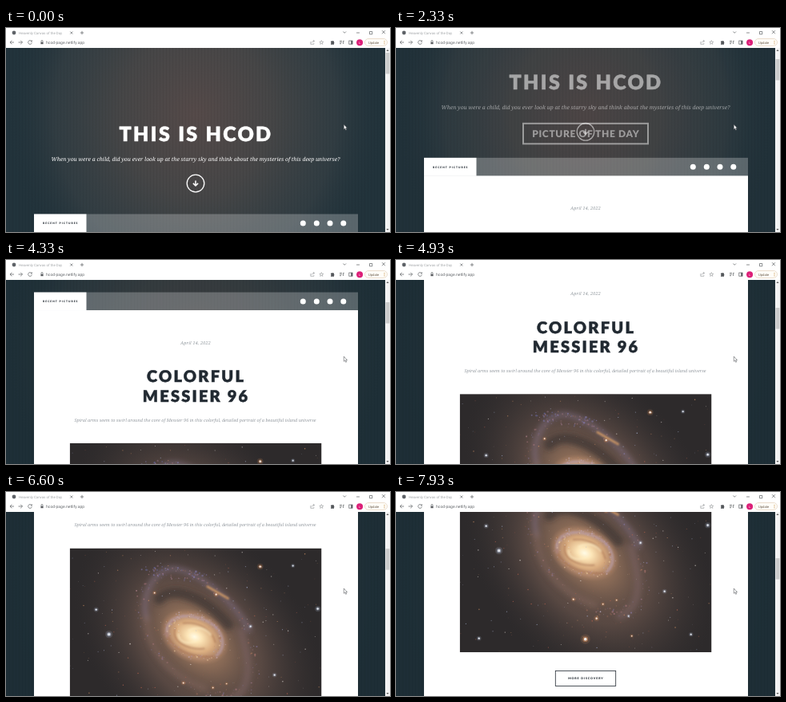
An HTML page for the animation above (8000 ms loop, 480 by 256 pixels).

```html
<!DOCTYPE html>
<html lang="en">
<head>
<meta charset="utf-8">
<title>Heavenly Canvas of the Day</title>
<style>
  html, body { margin: 0; width: 100%; height: 100%; overflow: hidden; background: #fff; }
  svg { display: block; width: 100vw; height: 100vh; }
  text { text-rendering: geometricPrecision; }
  .head { font-family: Lato, "Open Sans", sans-serif; font-weight: 900; text-anchor: middle; }
  .big { stroke: currentColor; stroke-width: .5; fill: currentColor; }
  .serif { font-family: "Noto Serif", serif; font-style: italic; text-anchor: middle; }
  .ui { font-family: Roboto, Arial, sans-serif; }
  .line { fill: none; stroke: #5a5d61; stroke-width: .7; }
</style>
</head>
<body>
<svg viewBox="0 0 480 256" preserveAspectRatio="none">
  <defs>
    <radialGradient id="warm" gradientUnits="userSpaceOnUse" cx="237" cy="108" r="235" gradientTransform="translate(0 -8) scale(1 1.08)">
      <stop offset="0" stop-color="#554a49"/>
      <stop offset=".4" stop-color="#4a4848" stop-opacity=".9"/>
      <stop offset=".75" stop-color="#3b4347" stop-opacity=".6"/>
      <stop offset="1" stop-color="#24353d" stop-opacity="0"/>
    </radialGradient>
    <radialGradient id="haze">
      <stop offset="0" stop-color="#7d6252" stop-opacity=".95"/>
      <stop offset=".5" stop-color="#66524a" stop-opacity=".75"/>
      <stop offset="1" stop-color="#3a3434" stop-opacity="0"/>
    </radialGradient>
    <radialGradient id="halo">
      <stop offset="0" stop-color="#c99c72" stop-opacity=".9"/>
      <stop offset=".45" stop-color="#93715a" stop-opacity=".7"/>
      <stop offset="1" stop-color="#5b4a43" stop-opacity="0"/>
    </radialGradient>
    <radialGradient id="core">
      <stop offset="0" stop-color="#fffbe6"/>
      <stop offset=".2" stop-color="#fde6b8"/>
      <stop offset=".55" stop-color="#e0b283" stop-opacity=".9"/>
      <stop offset=".8" stop-color="#b98d70" stop-opacity=".7"/>
      <stop offset="1" stop-color="#a77c62" stop-opacity="0"/>
    </radialGradient>
    <pattern id="weave" width="4" height="4" patternUnits="userSpaceOnUse">
      <path d="M.5 0V4" stroke="#000" stroke-opacity=".05"/>
    </pattern>
    <filter id="soft" x="-20%" y="-20%" width="140%" height="140%"><feGaussianBlur stdDeviation="3"/></filter>
    <filter id="fine" x="-20%" y="-20%" width="140%" height="140%"><feGaussianBlur stdDeviation=".9"/></filter>
    <clipPath id="frame"><rect width="314.8" height="235.5"/></clipPath>
  </defs>

  <rect width="480" height="256" fill="#22333b"/>
  <rect width="480" height="256" fill="url(#warm)"/>
  <rect id="shade" width="480" height="256" fill="#1b2a32"/>
  <rect width="480" height="256" fill="url(#weave)"/>

  <!-- y = 0 is the top of the navigation bar -->
  <g id="intro" fill="#fff" color="#fff">
    <text class="head big" x="237.5" y="-92" font-size="25" letter-spacing="2.3">THIS IS HCOD</text>
    <text class="serif" x="237" y="-67" font-size="6.85">When you were a child, did you ever look up at the starry sky and think about the mysteries of this deep universe?</text>
    <circle cx="237" cy="-38.5" r="10.8" fill="none" stroke="#fff" stroke-width="1.3"/>
    <path d="M237 -42V-35.8M233.9 -38.6L237 -35.5L240.1 -38.6" fill="none" stroke="#fff" stroke-width="1.5"/>
  </g>
  <g id="banner" fill="#fff">
    <rect x="159" y="-49" width="156" height="25.5" fill="none" stroke="#fff" stroke-width="2"/>
    <text class="head" x="237.3" y="-32" font-size="12" letter-spacing=".65">PICTURE OF THE DAY</text>
  </g>
  <g id="page">
    <rect x="35" width="405" height="22.5" fill="#fff" fill-opacity=".25"/>
    <rect x="35" width="65.5" height="23" fill="#fff"/>
    <text class="head" x="68.3" y="12.7" font-size="3.3" letter-spacing="1.03" fill="#212931">RECENT PICTURES</text>
    <g fill="#fff">
      <circle cx="371.3" cy="11.5" r="3.5"/><circle cx="388.3" cy="11.5" r="3.5"/>
      <circle cx="405" cy="11.5" r="3.5"/><circle cx="421.8" cy="11.5" r="3.5"/>
    </g>
    <rect x="35" y="22.5" width="405" height="760" fill="#fff"/>
    <text class="serif" x="237" y="65" font-size="5.4" font-weight="300" letter-spacing=".2" fill="#8d949a">April 14, 2022</text>
    <g class="head" font-size="20" letter-spacing="2.2" color="#212931">
      <text class="big" x="237.6" y="112.7">COLORFUL</text>
      <text class="big" x="237.6" y="137">MESSIER 96</text>
    </g>
    <text class="serif" x="236.5" y="162" font-size="5.52" font-weight="300" fill="#959ba1">Spiral arms seem to swirl around the core of Messier 96 in this colorful, detailed portrait of a beautiful island universe</text>
    <g id="sky" transform="translate(79.7 189.2)" clip-path="url(#frame)">
      <rect width="314.8" height="235.5" fill="#2d2a2b"/>
      <ellipse cx="162" cy="118" rx="185" ry="130" fill="url(#haze)" transform="rotate(50 162 118)"/>
      <ellipse cx="158" cy="112" rx="100" ry="62" fill="url(#halo)" transform="rotate(45 158 112)"/>
      <g fill="none" filter="url(#soft)" stroke-linecap="round">
        <path d="M96 88C88 62 104 24 132 26C160 29 205 66 224 102" stroke="#8a7890" stroke-width="7" opacity=".45"/>
        <path d="M96 88C98 130 126 160 168 176" stroke="#86695f" stroke-width="9" opacity=".45"/>
        <path d="M214 104C228 150 226 180 200 190" stroke="#83696a" stroke-width="9" opacity=".45"/>
        <path d="M112 64C128 46 168 60 198 96" stroke="#352c2c" stroke-width="13" opacity=".6"/>
      </g>
      <ellipse cx="156" cy="111" rx="46" ry="33" fill="url(#core)" transform="rotate(25 156 111)"/>
      <g fill="none" filter="url(#fine)" stroke-linecap="round">
        <path d="M122 110C116 84 150 78 176 94C192 104 196 124 184 134" stroke="#b9a3bd" stroke-width="3.5" opacity=".5"/>
        <path d="M121 106C126 126 150 138 180 136M132 100C126 116 146 128 168 126M182 118C178 102 162 92 142 94" stroke="#a06a4c" stroke-width="2" opacity=".55"/>
        <path d="M136 108C136 118 148 121 158 116M176 108C170 100 158 98 149 103" stroke="#fff0c8" stroke-width="2.6" opacity=".55"/>
        <path d="M172 48L198 63" stroke="#e2a566" stroke-width="2.6" opacity=".8"/>
      </g>
    </g>
    <rect x="199.3" y="448" width="75.4" height="19" fill="none" stroke="#212931" stroke-width=".8"/>
    <text class="head" x="237.4" y="459" font-size="3.6" letter-spacing=".9" fill="#212931">MORE DISCOVERY</text>
  </g>

  <rect x="474" y="25" width="6" height="231" fill="#f3f3f3"/>
  <path d="M475.4 29L477 27L478.6 29ZM475.4 252L477 254L478.6 252Z" fill="#606060"/>
  <rect id="thumb" x="474.6" y="31" width="4.8" height="26.5" fill="#cacaca"/>

  <g class="ui">
    <rect width="480" height="25" fill="#fff"/>
    <circle cx="10" cy="6" r="2.4" fill="#5f6368"/>
    <text x="16" y="7.6" font-size="4.4" fill="#a3a6a9">Heavenly Canvas of the Day</text>
    <path class="line" d="M80.3 4.5L83.3 7.5M83.3 4.5L80.3 7.5M92.8 6H97.2M95 3.8V8.2"/>
    <path class="line" d="M421.5 4.5L423.3 6.3L425.1 4.5M438 6H442M454.5 4.5H457.8V7.8H454.5ZM470 3.2L474 7.2M474 3.2L470 7.2"/>
    <path class="line" d="M10 18H5M7.3 15.7L5 18L7.3 20.3M15.5 18H20.5M18.2 15.7L20.5 18L18.2 20.3M32 16.6A2.4 2.4 0 1 0 32.4 18.4M32.4 15.4V17H30.8"/>
    <path d="M43.4 17.7H46.6V20.2H43.4Z" fill="#5a5d61"/>
    <path class="line" d="M44 17.7V16.5A1 1 0 0 1 46 16.5V17.7" stroke-width=".5"/>
    <text x="50" y="19.8" font-size="5.05" fill="#65696d">hcod-page.netlify.app</text>
    <g opacity=".6">
      <path class="line" d="M380.8 17V20.3H384.8V19M382.2 18.6C382.4 17 383.5 16.4 385.4 16.4M384 15L385.6 16.4L384 17.8"/>
      <path class="line" d="M394.3 15.6L395 17.3L396.8 17.4L395.4 18.6L395.9 20.3L394.3 19.4L392.7 20.3L393.2 18.6L391.8 17.4L393.6 17.3Z"/>
    </g>
    <path d="M406 16.6H407.3A1 1 0 0 1 409.1 16.6H410V18A1 1 0 0 1 410 19.6V20.8H406V19.5A.9 .9 0 0 0 406 17.9Z" fill="#54575b"/>
    <path class="line" d="M417 16.3H420M417 18H420M417 19.7H419M421.5 20V16.3H422.8"/>
    <rect class="line" x="428.8" y="16" width="4.2" height="4.2"/>
    <rect x="431.2" y="16" width="2" height="4.2" fill="#5a5d61"/>
    <circle cx="442.1" cy="18.2" r="4" fill="#dc1f78"/>
    <text x="442.1" y="19.5" font-size="3.6" text-anchor="middle" fill="#fff">L</text>
    <rect x="448.5" y="13.5" width="28" height="9" rx="4.5" fill="#fffdf8" stroke="#e3d0bb" stroke-width=".7"/>
    <text x="453" y="19.6" font-size="4.2" fill="#6a5b4c">Update</text>
    <path d="M473 16V20.4" stroke="#c08a3e" stroke-width=".8" stroke-dasharray="1 .7"/>
  </g>
  <path d="M422.3 121V127.2L423.7 126L424.7 128.3L425.7 127.8L424.7 125.6H426.5Z" fill="#fff" stroke="#3d4145" stroke-width=".5"/>
</svg>
<script>
const LOOP = 8000, NAV_TOP = 233.5;
const $ = id => document.getElementById(id);
const parts = { intro: $('intro'), banner: $('banner'), page: $('page') };
const shade = $('shade'), thumb = $('thumb'), sky = $('sky');

// [time, value] pairs
const SCROLL = [[1733, 0], [1800, .5], [1930, 13], [2330, 70.5], [2470, 92], [2600, 105],
  [3400, 105], [3470, 112], [3530, 128.5], [3600, 135], [3730, 140], [3800, 140],
  [3930, 148], [4670, 231], [4930, 254.5], [6600, 352], [7930, 457], [8000, 460]];
const LAG = [[1800, 0], [2000, 5], [2330, 6], [2600, 0]];

const clamp = v => Math.min(1, Math.max(0, v));

function track(keys, t) {
  if (t <= keys[0][0]) return keys[0][1];
  for (let i = 1; i < keys.length; i++) {
    const [t0, a] = keys[i - 1], [t1, b] = keys[i];
    if (t <= t1) return a + (b - a) * (t - t0) / (t1 - t0);
  }
  return keys[keys.length - 1][1];
}

let seed = 96;
const rnd = () => (seed = (seed * 16807) % 2147483647) / 2147483647;

function star(x, y, r, color, opacity) {
  const dot = document.createElementNS('http://www.w3.org/2000/svg', 'circle');
  const attrs = { cx: x, cy: y, r, fill: color, opacity };
  for (const k in attrs) dot.setAttribute(k, attrs[k]);
  sky.appendChild(dot);
}

function glow(x, y, r, color) {
  star(x, y, r * 1.8, color, .15);
  star(x, y, r, color, .5);
  star(x, y, r * .55, '#fff', .85);
}

// scatters dots around a tilted ellipse
function ring(count, cx, cy, rx, ry, degrees, spread, size, tints) {
  const tilt = degrees * Math.PI / 180, c = Math.cos(tilt), s = Math.sin(tilt);
  for (let i = 0; i < count; i++) {
    const a = rnd() * Math.PI * 2, k = 1 + (rnd() - .5) * spread;
    const u = rx * k * Math.cos(a), v = ry * k * Math.sin(a);
    star(cx + u * c - v * s, cy + u * s + v * c, size * (.5 + rnd()), tints[i % tints.length], .15 + rnd() * .4);
  }
}

function buildSky() {
  const tints = ['#e8e2dc', '#c98d62', '#b0604c', '#a9b4d6'];
  for (let i = 0; i < 260; i++) {
    star(rnd() * 314, rnd() * 235, .25 + rnd() * .55, tints[i % 4], .3 + rnd() * .5);
  }
  ring(150, 160, 108, 92, 55, 50, .16, .8, ['#8f82b8', '#b77f86', '#9a6a5a']);
  ring(130, 156, 111, 36, 25, 25, .3, .8, ['#c7b2cc', '#a8704f', '#f4d5a4', '#b08fa5']);
  ring(60, 133, 32, 30, 6, 8, .9, .9, ['#8f8ad0', '#c593b4', '#6f74b8']);

  const white = [[49, 108, 2.6], [33, 77, 1.7], [226, 98, 1.6], [310, 76, 2], [256, 159, 1.6],
    [279, 22, 1.4], [24, 218, 1.6], [289, 213, 1.5], [211, 190, 1.3]];
  const amber = [[238, 23, 2.2], [106, 56, 1.5], [142, 169, 1.6], [179, 175, 1.4], [157, 219, 3.4],
    [171, 193, 2], [215, 215, 1.3], [183, 58, 1.9], [196, 170, 1.2]];
  white.forEach(s => glow(...s, '#c9d8f2'));
  amber.forEach(s => glow(...s, '#dd9361'));
}

const place = (el, y) => el.setAttribute('transform', `translate(0 ${y.toFixed(2)})`);

function draw(t) {
  const scroll = track(SCROLL, t), lag = track(LAG, t), top = NAV_TOP - scroll;
  const fade = 1 - (1 - clamp((t - 2030) / 1100)) ** 2;
  place(parts.page, top);
  place(parts.intro, top + lag);
  place(parts.banner, top + lag);
  parts.intro.setAttribute('opacity', 1 - fade);
  parts.banner.setAttribute('opacity', fade);
  shade.setAttribute('opacity', .5 * clamp(scroll / 240));
  thumb.setAttribute('y', 31 + scroll * .114);
}

buildSky();
const start = performance.now();
function tick() {
  draw((performance.now() - start) % LOOP);
  requestAnimationFrame(tick);
}
tick();
</script>
</body>
</html>
```
